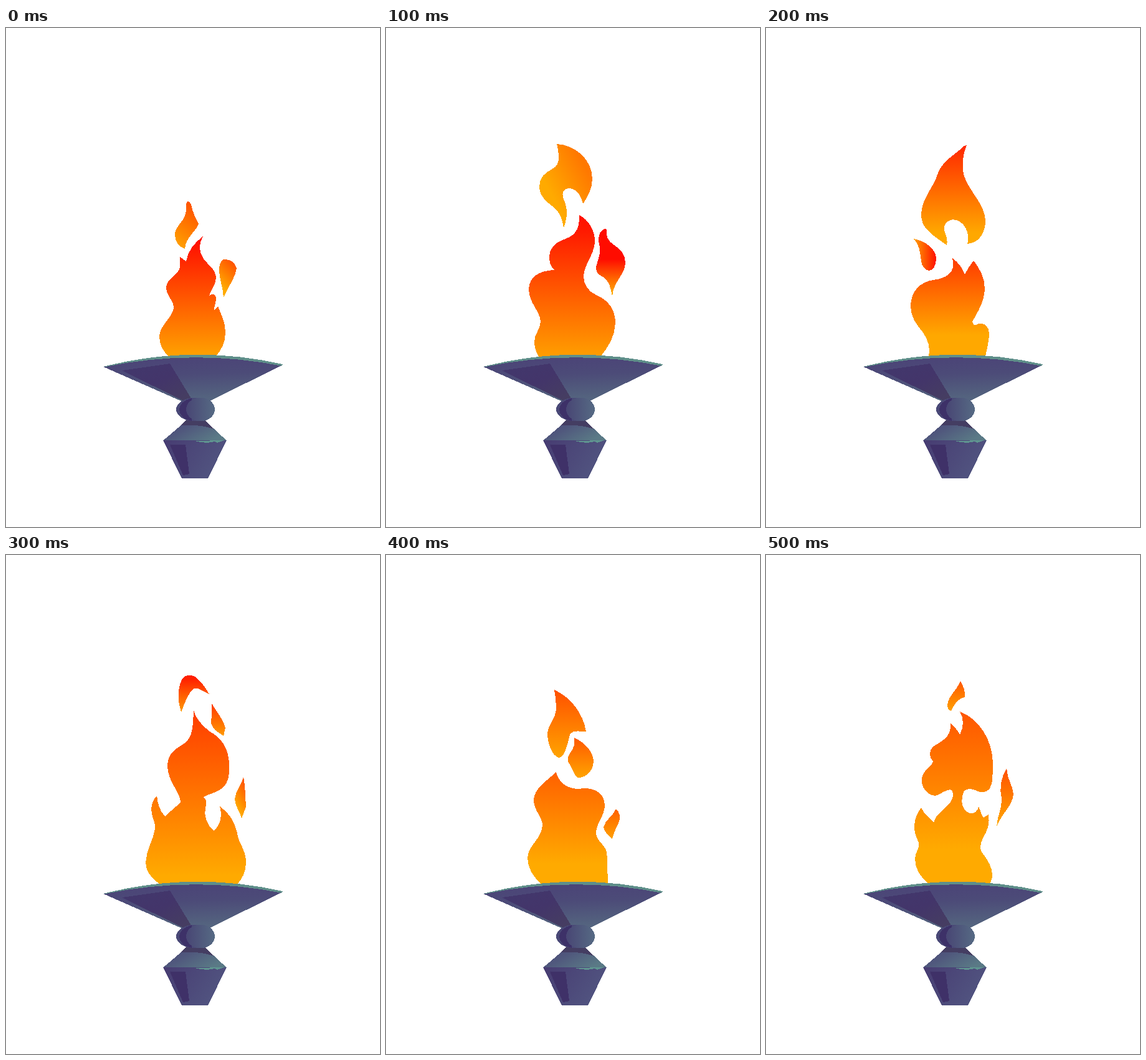
These frames come from a looping animation (600x800 px, 600 ms). An HTML page:

```html
<!DOCTYPE html>
<html lang="en">
<head>
<meta charset="utf-8">
<title>Torch</title>
<style>
  html, body { margin: 0; width: 100%; height: 100%; overflow: hidden; background: #fff; }
  svg { display: block; width: 100%; height: 100%; shape-rendering: crispEdges; }
  .pose { opacity: 0; animation: show 600ms step-end infinite; animation-delay: calc(var(--i) * 100ms - 600ms); }
  @keyframes show {
    0% { opacity: 1; }
    16.6667%, 100% { opacity: 0; }
  }
</style>
</head>
<body>
<svg viewBox="0 0 600 800">
  <defs id="defs">
    <linearGradient id="bowl" x1="0" y1="0" x2="0.15" y2="1">
      <stop offset="0" stop-color="#4b4377"/><stop offset=".45" stop-color="#4c4b78"/><stop offset="1" stop-color="#54647f"/>
    </linearGradient>
    <linearGradient id="bowlShade" x1="0" y1="0" x2="1" y2="1">
      <stop offset="0" stop-color="#42386d"/><stop offset=".5" stop-color="#43356a"/><stop offset="1" stop-color="#463f60"/>
    </linearGradient>
    <linearGradient id="ball">
      <stop offset="0" stop-color="#484674"/><stop offset="1" stop-color="#566a84"/>
    </linearGradient>
    <linearGradient id="collar" x1="0" y1="0" x2="1" y2=".6">
      <stop offset="0" stop-color="#4a4576"/><stop offset=".45" stop-color="#50587d"/><stop offset="1" stop-color="#5a7a86"/>
    </linearGradient>
    <linearGradient id="pot" x1="0" y1="0" x2="1" y2=".4">
      <stop offset="0" stop-color="#473c72"/><stop offset="1" stop-color="#515480"/>
    </linearGradient>
  </defs>
  <g id="fire"></g>
  <g id="torch">
    <path fill="#5f8f8a" d="M156 543Q300 506.5 444 539L441 542L160 544Z"/>
    <path fill="url(#bowl)" d="M157 543.5Q300 514 441 541.5L327 598H281Z"/>
    <path fill="url(#bowlShade)" d="M186 549L263 538L299 597H283Z"/>
    <path fill="url(#collar)" d="M290 629H319L354 661.5H252Z"/>
    <path fill="#443d62" d="M290 628H318L334 643C316 637 300 636 280 637Z"/>
    <ellipse cx="304" cy="611.5" rx="31" ry="19" fill="#4a4977"/>
    <path fill="#3d3168" d="M298 593C284 597 278 604 278 612C279 621 285 628 298 630Z"/>
    <ellipse cx="312" cy="611.5" rx="23" ry="19" fill="url(#ball)"/>
    <path fill="url(#pot)" d="M252 661H354L324 722H282Z"/>
    <path fill="#3f3168" d="M263 668H288L294 715L284 717Z"/>
    <path fill="#5f9590" d="M303 662L350 661L339 665L335 663L329 664C320 666 312 664 303 662Z"/>
  </g>
</svg>
<script>
const ns = 'http://www.w3.org/2000/svg';
const down = [0, 0, 0, 1], across = [0, 0, 1, 0], slant = [0.2, 0.75, 0.8, 0.2], lean = [0.7, 0, 0.35, 0.8];

// Each shape: path, gradient stops ("colour offset"), gradient direction
const poses = [
  [
    ['M316 334C309 346 309 358 317 370C324 380 336 386 337 400C337 412 329 418 326 429C331 425 336 427 337 432C337 440 334 446 334 452L340 446C345 460 352 470 352 488C352 505 345 517 336 527H261C252 518 246 508 246 494C247 476 266 466 269 449C269 436 257 430 257 415C258 402 276 396 279 384C280 378 279 372 279 367L289 374C292 356 303 344 316 334Z',
      '#ff0c00 0,#ff1800 .1,#ffa200 1'],
    ['M290 279C292 277 295 278 297 283C299 295 305 306 309 314C305 326 288 336 287 354C277 351 270 341 271 329C273 316 288 309 289 292C289 286 289 281 290 279Z',
      '#ff5000 0,#ffa000 1', [0.65, 0, 0.3, 1]],
    ['M349 371C358 370 367 375 370 385C369 398 357 414 349 432C348 415 342 402 342 388C342 380 344 373 349 371Z',
      '#ff5000 0,#ffaa00 1', lean]
  ],
  [
    ['M274 186C302 187 331 210 331 242C331 257 324 270 316 282C313 268 305 257 293 257C285 257 282 264 284 272C288 281 291 291 290 301C289 308 287 315 285 321C283 307 279 295 269 287C257 279 246 269 246 254C246 240 255 232 265 227C275 222 277 216 277 207C277 199 276 192 274 186Z',
      '#ffaa00 .15,#ff7800 1', slant],
    ['M310 300C325 307 336 326 335 344C333 366 317 380 317 399C317 411 325 423 337 428C357 436 368 452 368 473C367 495 357 511 344 527H245C241 520 238 512 238 503C238 490 247 485 248 471C247 453 229 441 229 418C230 400 244 389 270 388C264 383 262 376 262 366C262 354 271 344 283 340C300 334 311 327 310 300Z',
      '#ff1000 0,#ff1800 .1,#ff9e00 1'],
    ['M347 324Q351 321 354 323C352 333 356 342 366 348C377 355 384 364 384 376C384 396 365 405 363 430C361 417 357 405 350 400C343 397 336 393 337 383C340 370 345 362 343 351C340 342 340 329 347 324Z',
      '#ff0c00 .45,#ffa800 .95']
  ],
  [
    ['M322 188C315 205 313 222 318 238C327 263 352 284 352 309C352 329 341 345 323 346C328 331 319 308 300 307C290 308 285 315 286 324C289 333 292 341 290 348C280 341 269 334 260 325C252 317 249 310 249 298C250 273 269 255 275 235C282 213 304 203 318 189Z',
      '#ff2800 0,#ffa800 .88'],
    ['M237 338C255 341 273 354 273 370C273 381 268 389 261 389C254 388 250 381 249 374C247 361 247 348 237 338Z',
      '#ffa000 0,#ff1800 .95', across],
    ['M299 369C309 376 315 385 319 395C323 387 327 380 333 373C342 384 351 400 351 418C350 440 339 456 331 471C333 478 336 477 339 475C348 471 358 477 358 490C358 503 354 515 352 527H261C264 513 260 499 251 487C241 475 232 463 232 446C232 423 247 407 268 404C288 402 306 392 299 369Z',
      '#ff3a00 0,#ffa800 .78']
  ],
  [
    ['M281 252C275 235 275 214 282 200C287 192 295 191 303 195C313 202 320 213 326 223C316 219 309 212 302 214C293 219 288 234 281 252Z',
      '#ff2000 .1,#ff9c00 1'],
    ['M330 238C338 252 349 264 352 277L349 290C340 284 329 279 329 266C331 256 329 247 330 238Z',
      '#ff3800 0,#ff9a00 1'],
    ['M381 355C384 372 384 388 385 404L378 422C375 411 367 402 367 391C368 378 378 370 381 355Z',
      '#ff5000 0,#ffa800 1', lean],
    ['M301 249C304 260 312 272 327 283C346 293 358 311 358 337C359 352 357 365 348 373C339 381 325 383 317 388C323 393 322 399 320 405C317 418 322 433 333 442C345 433 347 416 343 403C358 413 367 428 371 446C373 463 385 472 385 493C385 509 379 518 371 528H247C233 518 224 507 224 493C225 472 236 458 239 439C240 426 233 421 233 407C234 398 237 390 242 386C243 398 247 411 255 419C263 411 273 404 280 396C279 379 259 363 259 337C260 316 273 311 286 302C300 293 300 272 301 249Z',
      '#ff3c00 0,#ffaa00 .95']
  ],
  [
    ['M270 216C296 228 316 253 321 283C310 283 300 280 295 288C291 303 287 325 277 325C265 321 259 300 259 285C260 272 272 262 273 248C273 237 272 226 270 216Z',
      '#ff5000 0,#ffa400 1'],
    ['M302 293C318 300 333 315 333 331C332 346 322 357 308 357C301 354 300 343 295 336C290 331 291 324 295 318C302 310 303 302 302 293Z',
      '#ff5800 0,#ffa400 1'],
    ['M369 407C375 412 377 421 373 430C369 438 365 446 363 455C356 450 350 443 349 436C352 424 364 419 369 407Z',
      '#ff6000 0,#ffa000 1'],
    ['M273 348C276 363 289 374 307 375C318 374 326 373 335 377C345 381 351 390 351 402C350 420 337 430 337 446C338 459 350 463 354 476C356 492 355 510 356 527H249C236 516 227 502 227 485C229 464 250 455 251 433C251 420 237 410 237 392C238 374 258 362 273 348Z',
      '#ff6000 0,#ffaa00 .82']
  ],
  [
    ['M312 202C317 210 320 220 319 228C309 229 302 239 297 250C293 249 291 245 291 240C293 225 306 217 312 202Z',
      '#ff5800 0,#ffa000 1'],
    ['M386 342C387 360 396 370 397 383C396 401 380 412 370 435C371 418 379 406 378 390C374 375 377 356 386 342Z',
      '#ff5000 0,#ffa800 1'],
    ['M311 251C341 262 364 296 364 335C363 352 365 365 359 374C354 381 345 382 338 378C328 373 320 375 317 380C313 390 313 401 319 409C327 418 339 415 341 403C344 409 345 416 349 421L357 416C359 430 356 441 348 454C343 465 342 472 348 479C356 489 363 501 363 513C363 519 361 523 359 527H261C248 517 239 504 239 487C239 476 247 471 245 461C241 452 238 446 238 435C238 423 243 413 249 405C253 415 262 421 269 429C272 416 283 411 291 402C299 394 302 386 299 378C295 374 290 378 284 380C275 386 271 388 262 383C253 377 249 369 250 358C252 344 265 341 268 331C262 325 261 315 267 308C277 300 298 295 296 270C302 275 307 280 311 288C317 276 318 263 311 251Z',
      '#ff5600 0,#ffaa00 .8']
  ]
];

function add(parent, tag, attrs) {
  const el = parent.appendChild(document.createElementNS(ns, tag));
  for (const key in attrs) el.setAttribute(key, attrs[key]);
  return el;
}

const defs = document.getElementById('defs');
const fire = document.getElementById('fire');

poses.forEach((shapes, i) => {
  const group = add(fire, 'g', { class: 'pose', style: `--i:${i}` });
  shapes.forEach(([d, stops, dir = down], j) => {
    const id = `heat${i}-${j}`;
    const [x1, y1, x2, y2] = dir;
    const heat = add(defs, 'linearGradient', { id, x1, y1, x2, y2 });
    for (const stop of stops.split(',')) {
      const [color, offset] = stop.split(' ');
      add(heat, 'stop', { offset, 'stop-color': color });
    }
    add(group, 'path', { d, fill: `url(#${id})` });
  });
});
</script>
</body>
</html>
```
